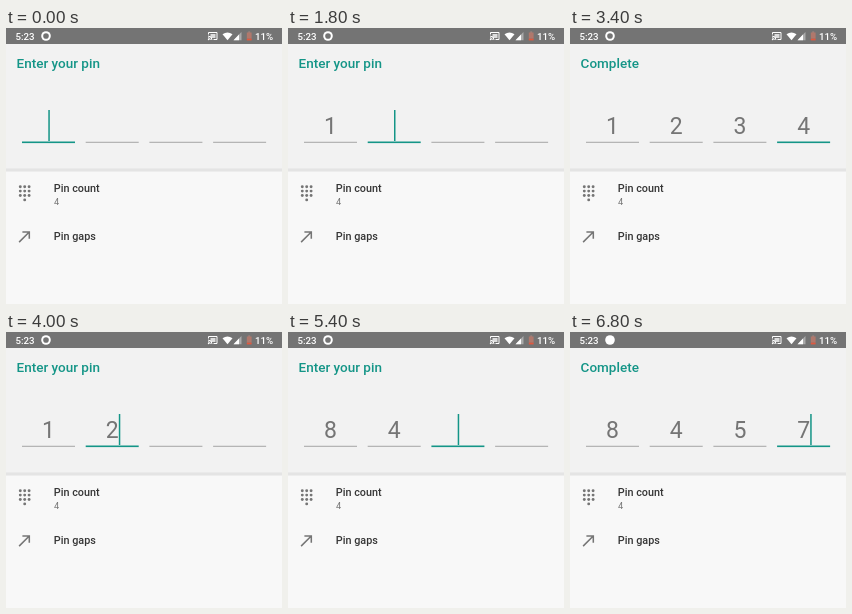
Write an HTML page with a canvas that moves like this. It is 276x276 px and loops after 7300 ms.

```html
<!DOCTYPE html>
<html lang="en">
<head>
<meta charset="utf-8">
<title>Pin entry</title>
<style>
  html, body { margin: 0; width: 100%; height: 100%; overflow: hidden; background: #f8f8f8; }
  canvas { display: block; width: 276px; height: 276px; }
</style>
</head>
<body>
<canvas id="stage"></canvas>
<script>
const SIZE = 276, LOOP = 7300, BLINK = 500;
const TEAL = '#149587', GREY = '#757575', WHITE = '#fff';
const FIELD = { x: 16, width: 53, step: 63.7, line: 114 };

// Each edit restarts the cursor blink: [time, digits, focused field]
const EDITS = [
  [0, '', 0],
  [1600, '1', 1], [1900, '12', 2], [2200, '123', 3], [2500, '1234', 3],
  [3500, '123', 2], [3800, '12', 1], [4100, '1', 0], [4400, '', 0],
  [4900, '8', 1], [5300, '84', 2], [5600, '845', 3], [5800, '8457', 3]
];
const RECORD_TOGGLES = [400, 1400, 2400, 3400, 4350, 5300, 6300];

const canvas = document.getElementById('stage');
const ctx = canvas.getContext('2d');
const ratio = window.devicePixelRatio || 1;
canvas.width = canvas.height = SIZE * ratio;

function rect(color, x, y, w, h) {
  ctx.fillStyle = color;
  ctx.fillRect(x, y, w, h);
}

function text(str, x, y, size, color, weight = 400, align = 'left') {
  ctx.font = `${weight} ${size}px Roboto, sans-serif`;
  ctx.textAlign = align;
  ctx.fillStyle = color;
  ctx.fillText(str, x, y);
}

function dot(x, y, r, color) {
  ctx.fillStyle = color;
  ctx.beginPath();
  ctx.arc(x, y, r, 0, Math.PI * 2);
  ctx.fill();
}

function shape(path, x, y, scale, color) {
  ctx.save();
  ctx.translate(x, y);
  ctx.scale(scale, scale);
  ctx.fillStyle = color;
  ctx.fill(new Path2D(path));
  ctx.restore();
}

function drawCast() {
  ctx.strokeStyle = WHITE;
  ctx.lineWidth = 1;
  ctx.stroke(new Path2D('M202.5 6.5V4.5H211V11.5H207.5'));
  for (const r of [2.3, 4]) {
    ctx.beginPath();
    ctx.arc(202, 12, r, -Math.PI / 2, 0);
    ctx.stroke();
  }
  dot(202.6, 11.4, 0.8, WHITE);
  rect('rgba(255,255,255,.75)', 204.5, 6, 5, 4);
}

function drawStatusBar(t) {
  rect('#747474', 0, 0, SIZE, 16);
  text('5:23', 9.5, 11.6, 9.7, WHITE, 500);

  const solid = RECORD_TOGGLES.filter(time => time <= t).length % 2 === 1;
  dot(40, 8, 4.8, WHITE);
  if (!solid) dot(40, 8, 2.8, '#747474');

  drawCast();
  shape('M216.5 6.3Q221.5 2.8 226.5 6.3L221.5 12.3Z', 0, 0, 1, WHITE);
  shape('M235.5 4V12.2H227.5Z', 0, 0, 1, 'rgba(255,255,255,.4)');
  shape('M233 6.6V12.2H227.5Z', 0, 0, 1, WHITE);
  rect('#b58a82', 242.2, 3.6, 2, 1);
  rect('#b0786c', 240.8, 4.5, 4.8, 6.2);
  rect('#e0583f', 240.8, 10.7, 4.8, 1.7);
  text('11%', 249, 11.8, 9.7, WHITE, 500);
}

function drawPin(t) {
  const [since, digits, focus] = EDITS.filter(edit => edit[0] <= t).pop();
  const cursorOn = Math.floor((t - since) / BLINK) % 2 === 0;
  const title = digits.length === 4 ? 'Complete' : 'Enter your pin';
  text(title, 10.6, 40, 13.5, TEAL, 500);

  for (let i = 0; i < 4; i++) {
    const x = FIELD.x + i * FIELD.step;
    const center = x + FIELD.width / 2;
    const digit = digits[i];
    if (digit) text(digit, center, 106.2, 23, GREY, 400, 'center');
    if (i === focus) {
      rect(TEAL, x, FIELD.line - 0.5, FIELD.width, 1.6);
      if (cursorOn) rect(TEAL, center - 0.2 + (digit ? 6.8 : 0), 82, 1.5, 31);
    } else {
      rect('#9c9c9c', x, FIELD.line - 0.2, FIELD.width, 0.9);
    }
  }
}

function drawSettings() {
  rect('#e4e4e4', 0, 140.5, SIZE, 3);
  for (let row = 0; row < 4; row++) {
    for (let col = 0; col < 3; col++) {
      if (row < 3 || col === 1) dot(14.3 + col * 4.4, 158.7 + row * 4.4, 1.45, GREY);
    }
  }
  text('Pin count', 47.8, 163.5, 10.8, '#363636', 500);
  text('4', 48, 176.6, 9.2, GREY);
  shape('M9 5v2h6.59L4 18.59 5.41 20 17 8.41V15h2V5z', 9.5, 199.3, 0.767, GREY);
  text('Pin gaps', 47.8, 212.3, 10.8, '#363636', 500);
}

function draw() {
  const t = performance.now() % LOOP;
  ctx.setTransform(ratio, 0, 0, ratio, 0, 0);
  rect('#f8f8f8', 0, 0, SIZE, SIZE);
  rect('#f2f2f2', 0, 16, SIZE, 125);
  drawStatusBar(t);
  drawPin(t);
  drawSettings();
  requestAnimationFrame(draw);
}

draw();
</script>
</body>
</html>
```
